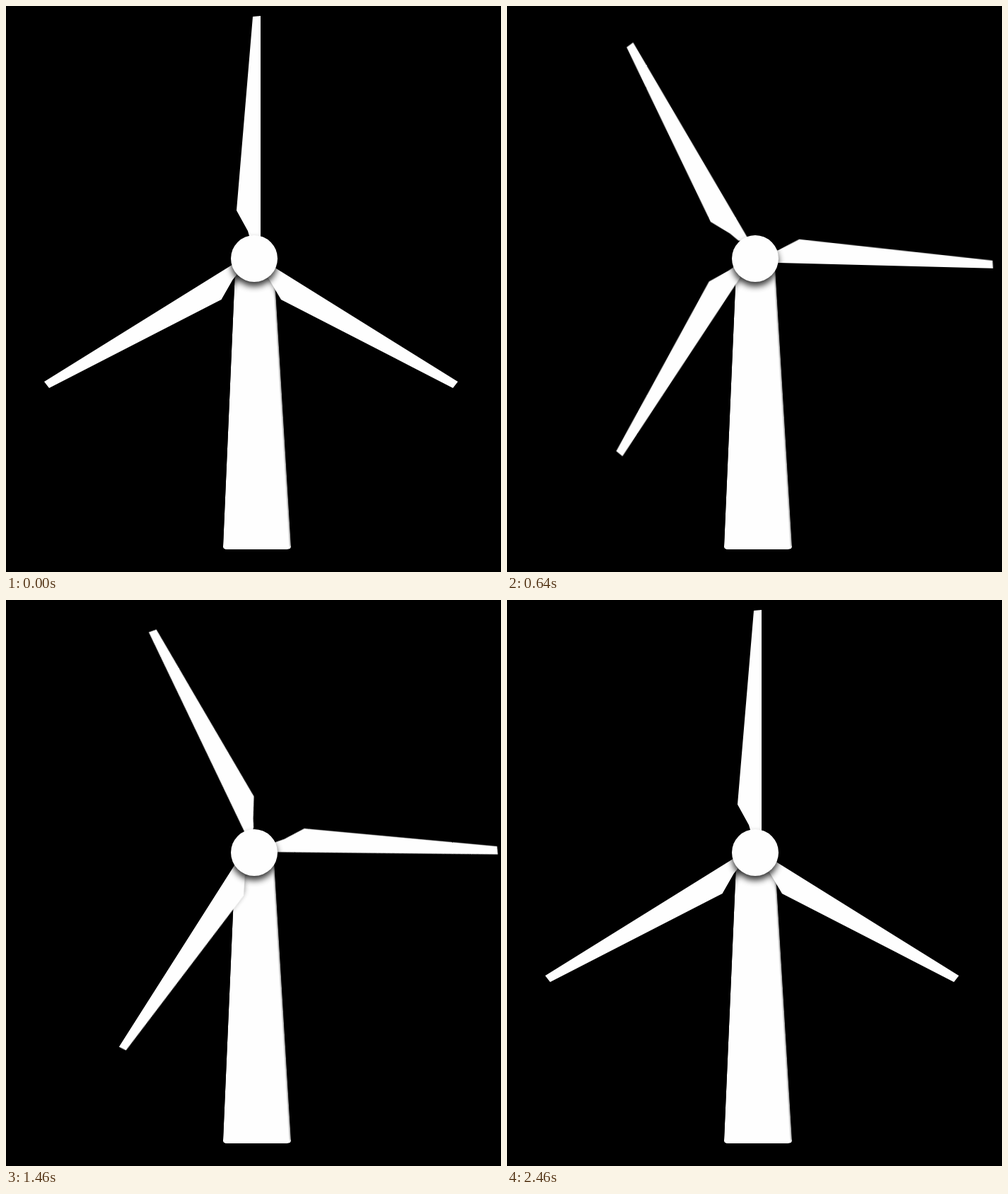
An HTML page for the animation above (2500 ms loop, 700 by 800 pixels).

```html
<!DOCTYPE html>
<html lang="en">
<head>
<meta charset="utf-8">
<title>Wind turbine</title>
<style>
  html, body { margin: 0; width: 100%; height: 100%; overflow: hidden; background: #000; }
  svg { display: block; width: 700px; height: 800px; }
  #rotor { transform-origin: 349.8px 351.9px; }
</style>
</head>
<body>
<svg viewBox="0 0 700 800">
  <defs>
    <filter id="soft" filterUnits="userSpaceOnUse" x="-50" y="-50" width="800" height="900">
      <feGaussianBlur stdDeviation="5"/>
    </filter>
    <filter id="edge" filterUnits="userSpaceOnUse" x="280" y="340" width="150" height="450">
      <feGaussianBlur stdDeviation="1"/>
    </filter>
    <path id="mast" d="M324.7 357H378.4L403 763.5Q403.5 768 397 768H312Q306.5 768 307 763.5Z"/>
    <clipPath id="mastClip"><use href="#mast"/></clipPath>
    <g id="blades">
      <path d="M349 15L360 14V350H347L344 325L342 318L326 289Z"/>
      <path d="M639 531L632 540L389 415L373 388L366 378L358 356Z"/>
      <path d="M54 531L61 540L304.5 415L320.5 387L330 375L334 357Z"/>
    </g>
  </defs>

  <g clip-path="url(#mastClip)">
    <use href="#mast" fill="#fefefe"/>
    <path d="M378.4 357L403 764" stroke="#000" stroke-opacity=".6" stroke-width="2" filter="url(#edge)"/>
  </g>

  <g id="rotor">
    <g filter="url(#soft)" opacity=".75">
      <use href="#blades" x="4" y="3"/>
    </g>
    <use href="#blades" fill="#fefefe"/>
  </g>

  <circle cx="351" cy="363" r="33" opacity=".8" filter="url(#soft)"/>
  <circle cx="351" cy="357" r="33" fill="#fefefe"/>
</svg>
<script>
  const LOOP = 2500, STEP = 20, STEPS = 122;
  const start = 19 / LOOP; // the first pose holds for two steps
  const turn = deg => `rotate(${deg}deg)`;

  document.getElementById('rotor').animate([
    { offset: 0, transform: turn(0) },
    { offset: start, transform: turn(0), easing: `steps(${STEPS}, end)` },
    { offset: start + STEPS * STEP / LOOP, transform: turn(360) },
    { offset: 1, transform: turn(360) }
  ], { duration: LOOP, iterations: Infinity });
</script>
</body>
</html>
```
